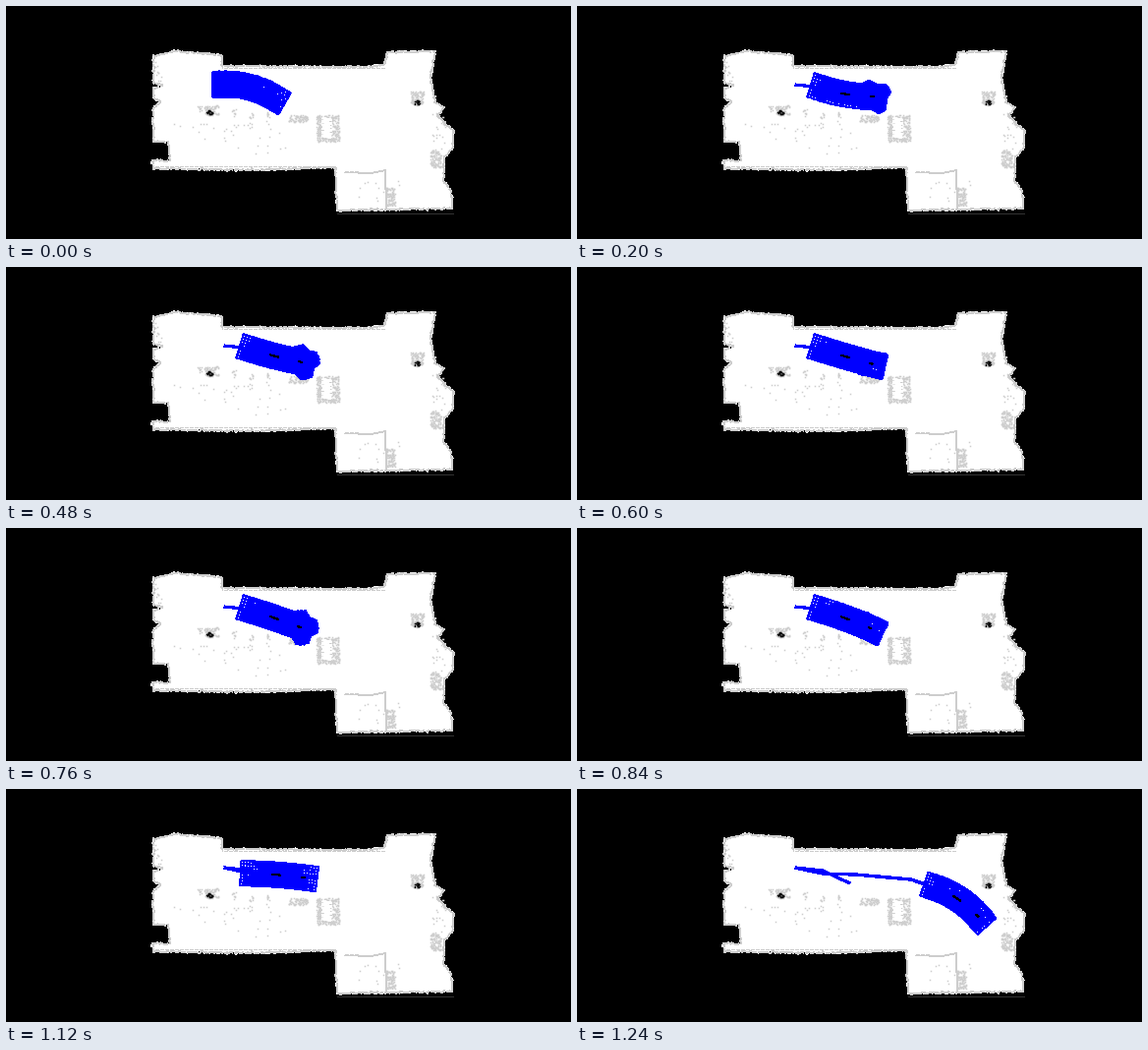
Write a matplotlib script that moves like this. It is 575x237 px and loops after 1.28 s.

```python
import numpy as np
import matplotlib.pyplot as plt
from matplotlib.animation import FuncAnimation
from matplotlib.collections import LineCollection
from matplotlib.patches import Polygon

W, H, DPI = 575, 237, 64
PX = 72 / DPI
BLUE, GREY = "#0000ff", "#cdcdcd"
FRAMES, STEP = 32, 40
HALF = 12.5    # half the side of the square footprint
REACH = 53     # length of one planned arc
POSES = 10

plt.rcParams["path.simplify"] = False
rng = np.random.default_rng(4)
fig = plt.figure(figsize=(W / DPI, H / DPI), dpi=DPI, facecolor="black")
ax = fig.add_axes([0, 0, 1, 1])
ax.set(xlim=(0, W), ylim=(H, 0))
ax.axis("off")


# ---- occupancy map ----
def stroke(points, color=GREY, width=1.0, z=3, dash="-"):
    line, = ax.plot(*np.transpose(points), color=color, lw=width * PX, ls=dash,
                    zorder=z, antialiased=False, solid_capstyle="butt")
    return line


def patch(points, color=GREY, z=3):
    ax.add_patch(Polygon(points, fc=color, ec="none", antialiased=False, zorder=z))


def specks(x, y, w, h, n, color=GREY, size=1.5):
    px, py = rng.uniform((x, y), (x + w, y + h), (n, 2)).T
    ax.plot(px, py, "s", color=color, ms=size * PX, mew=0, antialiased=False, zorder=3)


def rough(points, step=1.5, amount=0.7):
    """Subdivide a closed outline and jitter it."""
    out = []
    for a, b in zip(points, np.roll(points, -1, axis=0)):
        n = max(1, int(np.hypot(*(b - a)) / step))
        out.append(a + (b - a) * np.arange(n)[:, None] / n)
    out = np.vstack(out)
    return out + rng.normal(0, amount, out.shape)


room = np.array([
    (150, 51), (172, 46), (219, 50), (220, 61), (365, 62), (385, 60), (388, 47),
    (437, 46), (432, 72), (437, 98), (446, 103), (439, 112), (456, 127),
    (454, 146), (446, 154), (445, 178), (453, 188), (454, 206), (337, 208),
    (335, 164), (250, 167), (150, 165), (150, 157), (167, 157), (166, 138),
    (150, 138), (150, 103), (158, 98), (150, 94), (150, 84), (160, 81), (150, 78)], float)
patch(rough(room), "white", 1)
stroke(rough(np.vstack([room, room[:1]]), amount=0.5), width=1.2, z=2, dash=(0, (4, 1)))
stroke([(337, 211), (455, 211)], "#333333", 0.8)

for wall in ([(220, 50), (220, 63), (386, 63)], [(152, 163), (335, 163)],
             [(345, 169), (371, 170), (386, 167), (387, 206)]):
    stroke(wall, dash=(0, (3, 1.5)))

# scanned furniture: dense speckle, some with black cores
for x, y, w, h in ((316, 111, 23, 27), (288, 111, 19, 7), (387, 185, 9, 18),
                   (432, 147, 11, 17), (412, 87, 13, 14), (202, 102, 12, 9)):
    specks(x, y, w, h, int(0.6 * w * h))
for x, y in ((204, 106), (415, 96)):
    specks(x, y, 6, 4, 20, "black")
scribble = np.arange(12)
stroke(np.column_stack([322 + 9 * (scribble % 2), 114 + 1.8 * scribble]), "white", 1.5, 4)

# loose clutter along the lower half and the outer walls
for i in range(5):
    x = 195 + 17.5 * i
    specks(x, 99 + 2 * i, 4, 10, 9)
    specks(x, 120, 30, 30, 4)
specks(152, 53, 8, 26, 10)
specks(170, 118, 120, 10, 16)
specks(340, 172, 60, 30, 14)
specks(434, 105, 14, 45, 25)


# ---- planned motion ----
ORIGIN = np.array([222, 79.5])
BRANCH = np.array([(222, 80), (250, 83), (278, 96)])
ROUTE = np.array([(222, 80), (250, 86), (283, 87), (340, 92), (380, 106)])


def route_y(x):
    return np.interp(x, *ROUTE.T)


def plan(i):
    """Start point, heading, chord bearing and final turn (None: keep the arc's)."""
    if i < 2:
        return ORIGIN, 0, 15, None
    if i < 25:
        swing = 35 + 26 * np.cos((i - 2.6) * np.pi / 4)
        return np.array([250, 84]), 17, 12 + 0.7 * (i - 9), swing
    if i < 27:
        return BRANCH[2], 21, 8, None
    s = i - 27
    x = 222 + 27 * s + 2.2 * s * s
    y = route_y(x)
    heading = np.degrees(np.arctan2(route_y(x + 8) - y, 8))
    return np.array([x, y]), heading, 4 + 30 * (s / 4) ** 3, None


def arc(start, heading, bearing, t):
    """Points and headings along a circular arc, t from 0 to 1."""
    a, bend = np.radians([heading, 2 * (bearing - heading)])
    chord = a + bend * t / 2
    size = REACH * t * np.sinc(bend * t / (2 * np.pi))
    pos = start + size[:, None] * np.column_stack([np.cos(chord), np.sin(chord)])
    return pos, a + bend * t


ticks = np.linspace(-HALF, HALF, 9)
grid = np.array([[(k, -HALF), (k, HALF)] for k in ticks]
                + [[(-HALF, k), (HALF, k)] for k in ticks])


def sweep(start, heading, bearing, final):
    """Footprint grids along the arc, then a turn on the spot."""
    pos, turn = arc(start, heading, bearing, np.linspace(0, 1, POSES))
    if final is not None:
        spin = np.linspace(turn[-1], np.radians(final), 4)[1:]
        pos = np.vstack([pos, np.repeat(pos[-1:], len(spin), axis=0)])
        turn = np.append(turn, spin)
    c, s = np.cos(turn), np.sin(turn)
    rot = np.array([[c, s], [-s, c]]).transpose(2, 0, 1)
    return np.concatenate([grid @ r + p for r, p in zip(rot, pos)])


branch = stroke(BRANCH, BLUE, 2.2, 5)
route = stroke(ROUTE, BLUE, 2.4, 5)
swath = LineCollection([], colors=BLUE, linewidths=1.05 * PX, antialiaseds=False, zorder=6)
ax.add_collection(swath)
marks = [stroke(ROUTE, "black", 1.1, 7) for _ in range(2)]


def draw(i):
    start, heading, bearing, final = plan(i)
    swath.set_segments(sweep(start, heading, bearing, final))
    branch.set_data(*BRANCH[:0 if i < 2 else 2 if i < 25 else 3].T)
    xs = np.linspace(ORIGIN[0], start[0], 40)
    route.set_data(xs, route_y(xs))
    route.set_visible(i > 27)
    for line, span in zip(marks, ((0.37, 0.54), (0.93, 1.0))):
        pos, _ = arc(start, heading, bearing, np.linspace(*span, 5))
        line.set_data(*pos.T)
        line.set_visible(i >= 2)
    return [swath, branch, route, *marks]


anim = FuncAnimation(fig, draw, frames=FRAMES, interval=STEP, repeat=True,
                     repeat_delay=0, blit=False)
plt.show()
```
